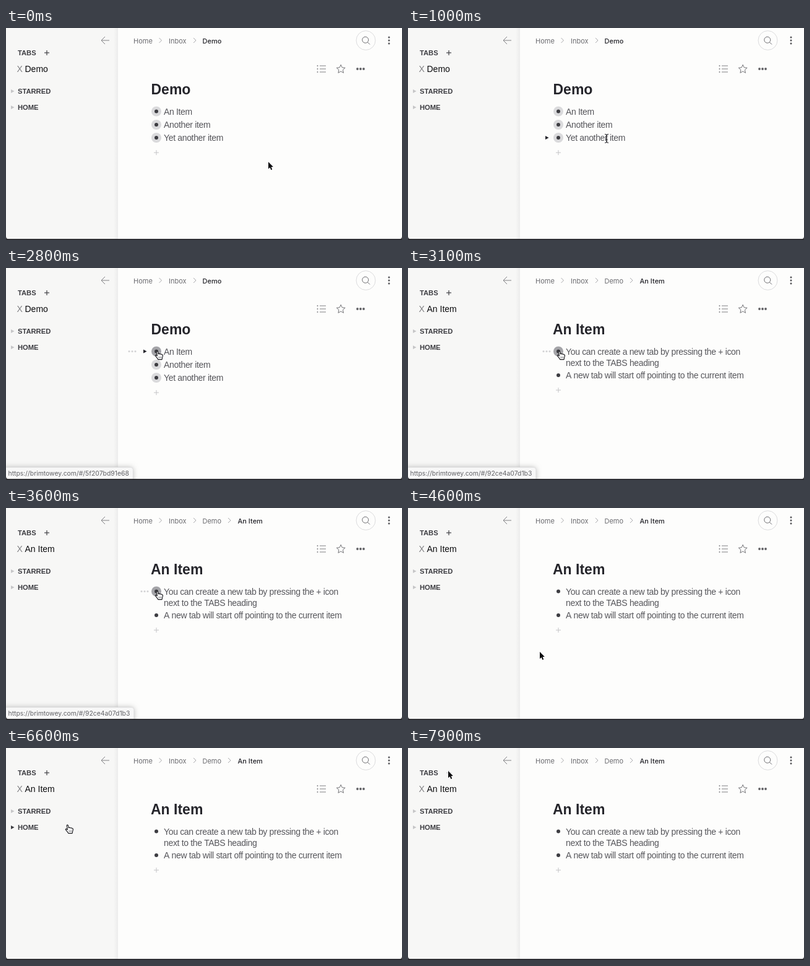
Animation, 640 px wide and 342 px high, one loop 8 s. Source, as an HTML page with a canvas:

```html
<!DOCTYPE html>
<html lang="en">
<head>
<meta charset="utf-8">
<title>Outline tabs</title>
<style>
  html, body { margin: 0; width: 100%; height: 100%; overflow: hidden; background: #fdfdfc; }
  canvas { display: block; width: 640px; height: 342px; }
</style>
</head>
<body>
<canvas id="stage"></canvas>
<script>
const canvas = document.getElementById('stage');
const ctx = canvas.getContext('2d');
const ratio = window.devicePixelRatio || 1;
canvas.width = 640 * ratio;
canvas.height = 342 * ratio;

const LOOP = 8000, STEP = 100, OPEN_AT = 3100;
const SANS = '"Liberation Sans", Arial, sans-serif';
const UI = 'Inter, Roboto, sans-serif';
const BG = '#fdfdfc', SIDE = '#f7f7f6';
const DARK = '#25252b', INK = '#3d3d42', MID = '#818184', PALE = '#c6c6c8';

const pages = [
  {
    title: 'Demo', left: 234.5, crumbs: ['Home', 'Inbox', 'Demo'],
    rows: [
      { y: 134.5, lines: ['An Item'], end: 300 },
      { y: 156, lines: ['Another item'], end: 330 },
      { y: 177, lines: ['Yet another item'], end: 350 }
    ],
    plusY: 201, halo: true, dotsX: 199,
    url: 'https://brimtowey.com/#/5f207bd91e68'
  },
  {
    title: 'An Item', left: 234, crumbs: ['Home', 'Inbox', 'Demo', 'An Item'],
    rows: [
      { y: 134.5, lines: ['You can create a new tab by pressing the + icon', 'next to the TABS heading'], end: 540 },
      { y: 173, lines: ['A new tab will start off pointing to the current item'], end: 543 }
    ],
    plusY: 197, halo: false, dotsX: 219,
    url: 'https://brimtowey.com/#/92ce4a07d1b3'
  }
];

// time, x, y of the pointer
const path = [
  [0, 424, 216], [400, 424, 216], [1300, 285, 165], [1600, 258, 138],
  [1900, 256, 136], [2300, 245, 134], [3900, 245, 134], [4500, 213, 232],
  [5500, 213, 232], [6300, 122, 146], [6600, 100, 124], [6800, 92, 112],
  [7300, 68, 52], [7600, 65, 37], [8000, 65, 37]
];

function pointerAt(t) {
  let i = 1;
  while (i < path.length - 1 && path[i][0] < t) i++;
  const [t0, x0, y0] = path[i - 1], [t1, x1, y1] = path[i];
  const p = Math.min(1, Math.max(0, (t - t0) / (t1 - t0)));
  const e = p * p * (3 - 2 * p);
  return { x: x0 + (x1 - x0) * e, y: y0 + (y1 - y0) * e };
}

function text(str, x, y, font, color, spacing = 0) {
  ctx.font = font;
  ctx.letterSpacing = spacing + 'px';
  ctx.fillStyle = color;
  ctx.fillText(str, x, y);
}

function trace(points, closed) {
  ctx.beginPath();
  points.forEach(([x, y], i) => i ? ctx.lineTo(x, y) : ctx.moveTo(x, y));
  if (closed) ctx.closePath();
}

function line(points, color, width = 1, closed = false) {
  trace(points, closed);
  ctx.strokeStyle = color;
  ctx.lineWidth = width;
  ctx.stroke();
}

function dot(x, y, r, color) {
  ctx.beginPath();
  ctx.arc(x, y, r, 0, 7);
  ctx.fillStyle = color;
  ctx.fill();
}

function ring(x, y, r, color, width = 1) {
  ctx.beginPath();
  ctx.arc(x, y, r, 0, 2 * Math.PI);
  ctx.strokeStyle = color;
  ctx.lineWidth = width;
  ctx.stroke();
}

function plus(x, y, r, color, width = 1) {
  line([[x - r, y], [x + r, y]], color, width);
  line([[x, y - r], [x, y + r]], color, width);
}

function dots(x, y, r, color) {
  for (let i = 0; i < 3; i++) dot(x + i * 5, y, r, color);
}

function triangle(x, y, color) {
  trace([[x, y - 3], [x + 5.5, y], [x, y + 3]], true);
  ctx.fillStyle = color;
  ctx.fill();
}

function rowAt(page, p) {
  if (p.x < 195 || p.x > 580) return -1;
  return page.rows.findIndex(r => p.y > r.y - 10.5 && p.y < r.y + 10.5 + (r.lines.length - 1) * 18);
}

function bulletAt(page, p) {
  return page.rows.findIndex(r => Math.hypot(p.x - 243, p.y - r.y) < 9);
}

const onLink = (p, y) => p.x < 176 && Math.abs(p.y - y) < 12;

function drawSidebar(page, p) {
  ctx.fillStyle = SIDE;
  ctx.fillRect(0, 0, 181, 342);
  const edge = ctx.createLinearGradient(174, 0, 181, 0);
  edge.addColorStop(0, SIDE);
  edge.addColorStop(1, '#ececec');
  ctx.fillStyle = edge;
  ctx.fillRect(174, 0, 7, 342);

  line([[167, 20], [154, 20]], MID);
  line([[160, 14], [154, 20], [160, 26]], MID);
  const bold = 'bold 11.2px ' + SANS;
  text('TABS', 19, 44, bold, INK);
  const overPlus = Math.hypot(p.x - 66, p.y - 40) < 8;
  plus(66, 40, 4, overPlus ? PALE : INK, 1.2);
  text('X', 17.5, 70.5, '14px ' + SANS, MID);
  text(page.title, 30.5, 70.5, '14px ' + SANS, '#0c0c0e');
  [['STARRED', 102], ['HOME', 128]].forEach(([label, y]) => {
    triangle(8, y, onLink(p, y) ? INK : PALE);
    text(label, 19, y + 4, bold, INK);
  });
}

function drawHeader(page) {
  const starts = [206, 263, 317.5, 374.5];
  page.crumbs.forEach((name, i) => {
    const last = i === page.crumbs.length - 1;
    text(name, starts[i], 24.5, (last ? '500 ' : '') + '11px ' + UI, last ? DARK : '#6c6c70');
    const x = [247.5, 303, 359][i];
    if (!last) line([[x, 16], [x + 4, 20], [x, 24]], '#aaaaac');
  });
  ring(581.5, 20, 15.5, '#dcdcde');
  ring(580.8, 19.2, 5, '#6c6c70');
  line([[584.5, 23], [588, 26.5]], '#6c6c70');
  for (const y of [15, 20, 25]) dot(619, y, 1.5, '#56565a');

  for (const y of [61, 66, 71]) {
    dot(503.5, y, 1, MID);
    line([[507, y], [517, y]], MID);
  }
  const star = Array.from({ length: 10 }, (_, i) => {
    const a = i * Math.PI / 5 - Math.PI / 2, r = i % 2 ? 3.4 : 7.3;
    return [541.2 + r * Math.cos(a), 66.5 + r * Math.sin(a)];
  });
  line(star, '#737377', 1, true);
  dots(568, 66, 1.9, '#606064');
}

function drawList(page, p, before) {
  const hover = rowAt(page, p), active = bulletAt(page, p);
  const trailing = rowAt(page, before);
  text(page.title, page.left, 107, 'bold 23px ' + SANS, DARK);
  page.rows.forEach((row, i) => {
    if (i === active) dot(243, row.y, 8, '#a4a4a8');
    else if (page.halo) dot(243, row.y, 8, '#dadadc');
    dot(243, row.y, 3, INK);
    if (page.halo && i === hover) triangle(222, row.y, DARK);
    if (i === trailing) dots(page.dotsX, row.y, 1.5, '#d2d2d4');
    row.lines.forEach((s, n) => text(s, 255, row.y + 5.2 + n * 18, '14px ' + SANS, '#56565b', -0.34));
  });
  plus(243, page.plusY, 4, '#c4c4c6');
}

function drawTip(url) {
  const font = '10.4px ' + UI;
  ctx.font = font;
  ctx.letterSpacing = '0px';
  const w = ctx.measureText(url).width + 10;
  ctx.save();
  ctx.shadowColor = 'rgba(0, 0, 0, 0.25)';
  ctx.shadowBlur = 8 * ratio;
  ctx.beginPath();
  ctx.roundRect(-4, 321.5, w + 4, 24, 4);
  ctx.fillStyle = '#f7f7f7';
  ctx.fill();
  ctx.restore();
  ctx.strokeStyle = '#d4d4d6';
  ctx.lineWidth = 0.6;
  ctx.stroke();
  text(url, 3.5, 335, font, '#626266');
}

// dark strip below the rounded window
function drawFloor() {
  ctx.fillStyle = '#17171c';
  ctx.fillRect(0, 340.3, 640, 2);
  for (const [x, side] of [[0, 1], [640, -1]]) {
    ctx.beginPath();
    ctx.moveTo(x, 336);
    ctx.quadraticCurveTo(x, 340.3, x + 4 * side, 340.3);
    ctx.lineTo(x, 340.3);
    ctx.fill();
  }
}

function drawArrow() {
  ctx.scale(0.87, 0.87);
  trace([[0, 0], [0, 13], [3, 10.3], [5, 15], [7.2, 14], [5.2, 9.5], [9, 9.2]], true);
  ctx.lineWidth = 1.4;
  ctx.strokeStyle = '#fdfdfd';
  ctx.stroke();
  ctx.fillStyle = '#0c0c0e';
  ctx.fill();
}

function drawBeam() {
  line([[-3, -7], [-1, -6.5], [0, -5], [1, -6.5], [3, -7]], DARK, 1.2);
  line([[0, -5], [0, 5]], DARK, 1.3);
  line([[-3, 7], [-1, 6.5], [0, 5], [1, 6.5], [3, 7]], DARK, 1.2);
  line([[-1.8, 2], [1.8, 2]], DARK);
}

function drawHand() {
  ctx.scale(0.94, 0.94);
  ctx.lineJoin = 'round';
  trace([[-2, 1], [-0.8, 0], [0.5, 1], [1.2, 5], [3, 4.4], [4.2, 5.3], [6, 5],
    [7, 6], [8.5, 6.2], [9, 8], [8.2, 11], [7.5, 14.5], [1, 14.5],
    [-1.5, 11], [-4, 8], [-3.2, 6.6], [-0.6, 8.3]], true);
  ctx.fillStyle = '#fdfdfd';
  ctx.fill();
  ctx.lineWidth = 1.2;
  ctx.strokeStyle = '#1c1c20';
  ctx.stroke();
  for (const x of [2, 4, 6]) line([[x, 9.5], [x + 0.2, 12.2]], '#5a5a5e', 0.8);
}

function drawPointer(page, p) {
  const row = page.rows[rowAt(page, p)];
  ctx.save();
  ctx.translate(p.x, p.y);
  if (bulletAt(page, p) >= 0 || [65, 102, 128].some(y => onLink(p, y))) drawHand();
  else if (row && p.x > 252 && p.x < row.end) drawBeam();
  else drawArrow();
  ctx.restore();
}

function draw(t) {
  const page = pages[t < OPEN_AT ? 0 : 1];
  const p = pointerAt(t);
  ctx.setTransform(ratio, 0, 0, ratio, 0, 0);
  ctx.fillStyle = BG;
  ctx.fillRect(0, 0, 640, 342);
  drawSidebar(page, p);
  drawHeader(page);
  drawList(page, p, pointerAt(Math.max(0, t - 200)));
  if (bulletAt(page, p) >= 0) drawTip(page.url);
  drawFloor();
  drawPointer(page, p);
}

const start = performance.now();
function tick() {
  const t = (performance.now() - start) % LOOP;
  draw(Math.floor(t / STEP) * STEP);
  requestAnimationFrame(tick);
}
tick();
</script>
</body>
</html>
```
